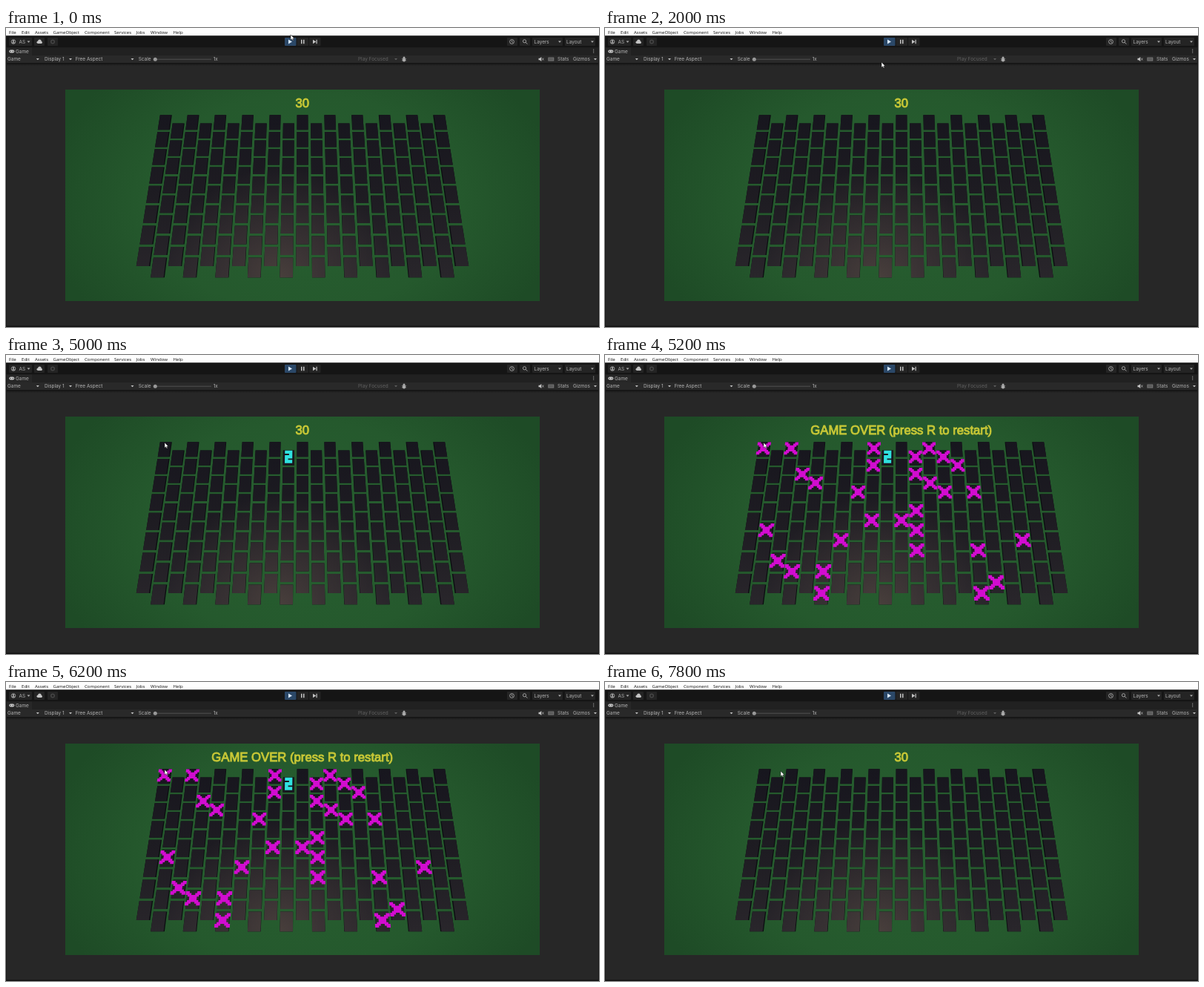
Write an HTML page that moves like this. It is 800 by 403 pixels and loops after 8000 ms.

```html
<!DOCTYPE html>
<html lang="en">
<head>
<meta charset="utf-8">
<title>Mine field</title>
<style>
html, body { margin: 0; width: 100%; height: 100%; overflow: hidden; background: #272727; }
svg { display: block; width: 100vw; height: 100vh; }
.menu { font: 6.1px "Open Sans", sans-serif; fill: #111; }
.ui { font: 6.45px Inter, sans-serif; fill: #b4b4b4; }
.dim { fill: #606060; }
.hud { font: 16.7px "Liberation Sans", Arial, sans-serif; fill: #bfc030; stroke: #cbca38; stroke-width: .9; text-anchor: middle; }
</style>
</head>
<body>
<svg id="stage" viewBox="0 0 800 403" preserveAspectRatio="none">
  <defs>
    <radialGradient id="felt" gradientUnits="userSpaceOnUse" cx="400" cy="235" r="350" gradientTransform="matrix(1 0 0 .7 0 70)">
      <stop offset="0" stop-color="#275f30"/>
      <stop offset=".6" stop-color="#25592d"/>
      <stop offset="1" stop-color="#1e4b26"/>
    </radialGradient>
    <linearGradient id="shade" x1="0" y1="0" x2="0" y2="1">
      <stop offset="0" stop-color="#111"/>
      <stop offset="1" stop-color="#272727"/>
    </linearGradient>
    <linearGradient id="face" gradientUnits="userSpaceOnUse" x1="0" y1="117" x2="0" y2="337">
      <stop offset="0" stop-color="#17161e"/>
      <stop offset=".5" stop-color="#1e1c22"/>
      <stop offset="1" stop-color="#29262b"/>
    </linearGradient>
    <radialGradient id="glow" gradientUnits="userSpaceOnUse" cx="368" cy="338" r="150">
      <stop offset="0" stop-color="#544842" stop-opacity=".75"/>
      <stop offset=".4" stop-color="#4a403e" stop-opacity=".5"/>
      <stop offset="1" stop-color="#4a403e" stop-opacity="0"/>
    </radialGradient>
  </defs>
  <g id="editor"></g>
  <rect x="80" y="83" width="640" height="285" fill="url(#felt)"/>
  <g id="tiles"></g>
  <g id="mines" fill="#d20cd0"></g>
  <path id="two" d="M-5-6.3H2.8V0H-2.8V6.3H5" fill="none" stroke="#2fe2e0" stroke-width="4.4"/>
  <text id="score" class="hud" x="399.7" y="107">30</text>
  <text id="over" class="hud" x="399.7" y="107">GAME OVER (press R to restart)</text>
  <path id="cursor" d="M0 0V7.2L1.7 5.7 2.8 8.1 4 7.5 2.9 5.2H5Z" fill="#fff" stroke="#111" stroke-width=".5"/>
</svg>
<script>
const $ = id => document.getElementById(id);
const LOOP = 8000, STEP = 200;
// tile size in grid units; LIFT is the parallax of the raised face
const LIFT = 1.007, HALF = 0.4, TOP = 0.05, LENGTH = 1.76;

// ---- editor chrome
const rect = (x, y, w, h, fill, rx = 0) =>
  `<rect x="${x}" y="${y}" width="${w}" height="${h}" fill="${fill}" rx="${rx}"/>`;
const text = (x, y, s, cls = "ui") => `<text x="${x}" y="${y}" class="${cls}">${s}</text>`;
const shape = (d, fill = "#c4c4c4") => `<path d="${d}" fill="${fill}"/>`;
const line = (d, color = "#c4c4c4", w = 0.9) =>
  `<path d="${d}" fill="none" stroke="${color}" stroke-width="${w}"/>`;
const dot = (x, y, r, fill = "#c4c4c4") => `<circle cx="${x}" cy="${y}" r="${r}" fill="${fill}"/>`;
const ring = (x, y, r, color, w) =>
  `<circle cx="${x}" cy="${y}" r="${r}" fill="none" stroke="${color}" stroke-width="${w}"/>`;
const caret = (x, y, fill) => shape(`M${x - 2} ${y - 1}h4l-2 2.2z`, fill);

function drawEditor() {
  const menu = [["File", 4], ["Edit", 21], ["Assets", 39], ["GameObject", 63.5], ["Component", 106],
    ["Services", 146], ["Jobs", 175.5], ["Window", 195], ["Help", 225.5]];
  const out = [
    rect(0, 0, 800, 403, "#272727"),
    rect(0, 0, 800, 10.5, "#fdfdfd"),
    ...menu.map(([s, x]) => text(x, 7.6, s, "menu")),
    rect(0, 10.5, 800, 16, "#151515"),
    rect(0, 26.5, 800, 10.5, "#212121"),
    rect(1, 26.5, 34, 10.5, "#272727"),
    rect(0, 37, 800, 10, "#292929"),
    rect(0, 47, 800, 4, "url(#shade)"),
    rect(0, 401.5, 800, 1.5, "#111"),
    rect(0, 26.5, 1, 376, "#181818"),
    rect(799, 26.5, 1, 376, "#181818")
  ];
  // main toolbar
  for (const [x, w] of [[4, 31], [38, 14], [56, 14], [392.5, 15.5], [409, 15.5], [676, 14], [693, 14], [710, 41], [754, 41]])
    out.push(rect(x, 13, w, 11, "#242424", 1));
  out.push(
    rect(376, 13, 15.5, 11, "#2b4868", 1),
    shape("M381 15.5v6l5-3z", "#d9e8fa"),
    shape("M398 15.7h1.5v5.6h-1.5zM401 15.7h1.5v5.6h-1.5z"),
    shape("M414 15.7v5.6l4.3-2.8zM418.5 15.7h1.2v5.6h-1.2z"),
    ring(10, 18.5, 2.8, "#b8b8b8", 0.8), dot(10, 17.6, 1.1), shape("M8 20.6q0-1.7 2-1.7t2 1.7z"),
    text(17.5, 20.8, "AS"), caret(30.5, 18.5, "#b4b4b4"),
    dot(43.3, 19.2, 1.8), dot(45.4, 17.8, 2.3), dot(47.3, 19.4, 1.6), rect(43, 19, 4.5, 2, "#c4c4c4"),
    ring(63, 18.5, 2.3, "#454545", 1.5),
    ring(682.5, 18.5, 2.9, "#bbb", 0.8), line("M682.5 16.7v2l1.5.9", "#bbb", 0.7),
    ring(699.5, 17.8, 2.1, "#bbb", 0.8), line("M701 19.3l2.3 2.3", "#bbb"),
    text(712.5, 20.8, "Layers"), caret(747, 18.5, "#b4b4b4"),
    text(756, 20.8, "Layout"), caret(791, 18.5, "#b4b4b4")
  );
  // tab and view bar
  out.push(
    rect(4.3, 29.5, 7, 4, "#d0d0d0", 2), dot(6.2, 31.5, 0.7, "#292929"), dot(9.4, 31.5, 0.7, "#292929"),
    text(13, 33.7, "Game"),
    ...[29, 31, 33].map(y => dot(792.7, y, 0.6)),
    text(2, 44.3, "Game"), caret(42.8, 42), text(52, 44.3, "Display 1"), caret(87, 42),
    text(93.7, 44.3, "Free Aspect"), caret(170.5, 42),
    text(178.7, 44.3, "Scale"), line("M203 42.2H277", "#555", 0.9), dot(201.3, 42.2, 2.5, "#999"),
    text(279.7, 44.3, "1x"),
    text(475, 44.3, "Play Focused", "ui dim"), caret(526, 42, "#606060"),
    dot(537, 40, 1.6, "#aaa"), rect(534.9, 40.8, 4.2, 4.6, "#aaa", 1.8),
    line("M533.8 41.5h6.4M533.8 43.8h6.4", "#aaa", 0.6),
    shape("M718.5 40.8h1.6l2.2-1.8v6l-2.2-1.8h-1.6z"), line("M723.4 40.5l2 3M725.4 40.5l-2 3", "#c4c4c4", 0.6),
    rect(731.3, 39.5, 8, 5, "#777", 0.6), line("M732.3 41h6M732.3 42.8h6", "#2a2a2a", 0.6),
    text(744, 44.3, "Stats"), text(765, 44.3, "Gizmos"), caret(795, 42)
  );
  $("editor").innerHTML = out.join("");
}

// ---- board in perspective: spacing grows linearly with screen height
const spacing = r => 1 / (0.05453 - 0.000495 * r);
const rowY = r => 127.5 + (spacing(r) - 18.5) / 0.01505;
const point = (u, r, k = 1) => `${(400 + u * k * spacing(r)).toFixed(2)} ${rowY(r).toFixed(2)}`;
const quad = (a, b, r, ka, kb) =>
  `M${point(a, r, ka)}L${point(b, r, kb)} ${point(b, r + LENGTH, kb)} ${point(a, r + LENGTH, ka)}Z`;

function drawTiles() {
  let sides = "", faces = "";
  for (let r = 0; r < 16; r++) {
    for (let u = r % 2 - 10; u <= 10; u += 2) {
      const a = u - HALF, b = u + HALF;
      sides += quad(a, b, r + TOP, u > 0 ? 1 : LIFT, u < 0 ? 1 : LIFT);
      faces += quad(a, b, r + TOP, LIFT, LIFT);
    }
  }
  $("tiles").innerHTML = shape(sides, "#0b0c10") + shape(faces, "url(#face)") + shape(faces, "url(#glow)");
}

function place(u, r) {
  const mid = r + 0.86, s = spacing(mid), k = s / 18.5;
  return `matrix(${k} 0 ${k * u * 0.0152} ${k} ${400 + u * LIFT * s} ${rowY(mid) - 0.5})`;
}

// mined columns, row by row
const MINES = [[-10, -8, -2, 2], [1, 3], [-2, 4], [-7, 1], [-6, 2], [-3, 3, 5], [], [1],
  [-2, 0], [-9, 1], [-4, 8], [1, 5], [-8], [-7, -5], [6], [-5, 5]];

// pixel cross on an 8 by 8 grid, strokes three cells wide
function crossPath() {
  const W = 2.25, H = 2.1;
  let d = "";
  for (let y = 0; y < 8; y++)
    for (const x of [y, 7 - y]) {
      const a = Math.max(x - 1, 0), b = Math.min(x + 2, 8);
      d += `M${(a - 4) * W} ${(y - 4) * H}h${(b - a) * W}v${H}h${(a - b) * W}z`;
    }
  return d;
}

function drawMines() {
  const cross = crossPath();
  $("mines").innerHTML = MINES.map((cols, r) =>
    cols.map(u => `<path d="${cross}" transform="${place(u, r)}"/>`).join("")).join("");
  $("two").setAttribute("transform", place(-1, 1));
}

// ---- motion: time, x, y
const PATH = [[0, 384, 9], [1200, 384, 9], [2000, 373, 46], [2400, 379, 109], [3000, 382, 134],
  [3800, 382, 134], [5000, 214, 118], [7200, 214, 118], [7800, 237, 120], [LOOP, 237, 120]];

function cursorAt(t) {
  const i = PATH.findIndex(p => p[0] > t);
  const [t0, x0, y0] = PATH[i - 1], [t1, x1, y1] = PATH[i];
  const p = (t - t0) / (t1 - t0), e = p * p * (3 - 2 * p);
  return [x0 + (x1 - x0) * e, y0 + (y1 - y0) * e];
}

const show = (id, on) => $(id).setAttribute("visibility", on ? "visible" : "hidden");

function render(ms) {
  const t = Math.floor(ms % LOOP / STEP) * STEP;
  const lost = t >= 5200 && t < 7400;
  show("two", t >= 3000 && t < 7400);
  show("mines", lost);
  show("over", lost);
  show("score", !lost);
  $("cursor").setAttribute("transform", `translate(${cursorAt(t)})`);
}

drawEditor();
drawTiles();
drawMines();
const start = performance.now();
function tick() {
  render(performance.now() - start);
  requestAnimationFrame(tick);
}
tick();
</script>
</body>
</html>
```
